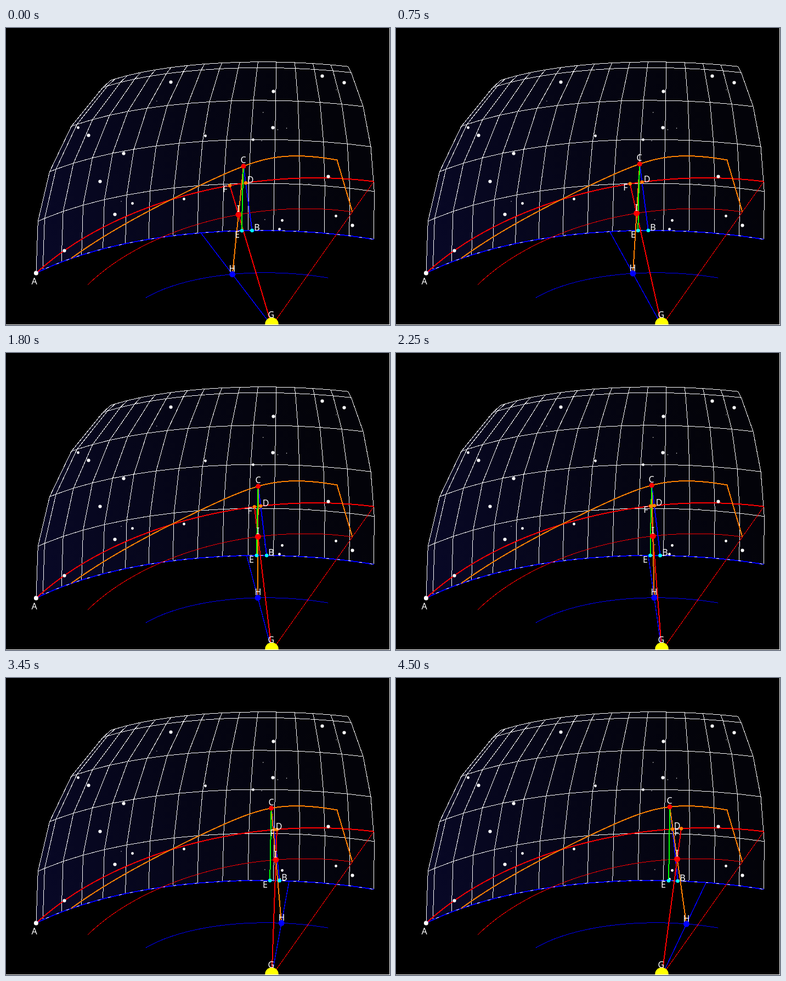
An HTML page that plays this animation: 700x541 px, repeating every 4.65 s.

```html
<!DOCTYPE html>
<html lang="en">
<head>
<meta charset="utf-8">
<title>Planet on the celestial sphere</title>
<style>
  html, body { margin: 0; width: 100%; height: 100%; overflow: hidden; background: #000; }
  svg { display: block; width: 100vw; height: 100vh; }
  path { shape-rendering: crispEdges; fill: none; }
  text { font: 16px "Noto Sans", "Open Sans", sans-serif; fill: #fff; text-anchor: middle; }
</style>
</head>
<body>
<svg viewBox="0 0 700 541">
  <defs>
    <linearGradient id="sky" gradientUnits="userSpaceOnUse" x1="70" y1="400" x2="600" y2="180">
      <stop offset="0" stop-color="#080826"/>
      <stop offset="1" stop-color="#030309"/>
    </linearGradient>
  </defs>
  <g id="scene" transform="translate(.5 .5)"></g>
  <path d="M699.5,0V540.5H0" stroke="#fff"/>
</svg>
<script>
const STEP = 150, STEPS = 31, RAD = Math.PI / 180;
const ORANGE = '#ff8000', RED = '#f00', BLUE = '#00f', CYAN = '#0ff', WHITE = '#fff';
const scene = document.getElementById('scene');

// Sphere of radius 1 around the sun; angles in degrees
const WEST = -62.3, EAST = 24, TOP = 50.5;
const LON_STEP = 6, LAT_STEP = 12;
const INNER = .512, OUTER = .765, INCLINATION = 14.6;
const ELEVATION = 23, ROLL = 1;

const sin = deg => Math.sin(deg * RAD), cos = deg => Math.cos(deg * RAD);
const sphere = (lon, lat = 0, r = 1) =>
  [r * cos(lat) * sin(lon), r * sin(lat), r * cos(lat) * cos(lon)];
const dotProduct = (a, b) => a[0] * b[0] + a[1] * b[1] + a[2] * b[2];
const along = (a, dir, t) => a.map((v, i) => v + dir[i] * t);
const unit = v => v.map(c => c / Math.hypot(...v));

function project([x, y, z]) {
  const up = y * cos(ELEVATION) + z * sin(ELEVATION);
  const depth = z * cos(ELEVATION) - y * sin(ELEVATION);
  const scale = 444 / (.835 + .179 * depth);
  return [
    484 + scale * (x * cos(ROLL) + up * sin(ROLL)),
    542 - scale * (up * cos(ROLL) - x * sin(ROLL))
  ];
}

const SUN = [0, 0, 0];
// Pole of the outer orbit, whose ascending node lies at the west edge
const POLE = [-sin(INCLINATION) * sin(WEST + 90), cos(INCLINATION),
  -sin(INCLINATION) * cos(WEST + 90)];

const orbitLat = lon => Math.atan(Math.tan(INCLINATION * RAD) * sin(lon - WEST)) / RAD;
const innerLon = lon => -17.2 + (lon + 10.5) * 1.88;
const outerPlanet = (lon, r = OUTER) => sphere(lon, orbitLat(lon), r);

// Where the line of sight from the inner to the outer planet meets the sphere
function sighting(lon) {
  const from = sphere(innerLon(lon), 0, INNER);
  const dir = along(outerPlanet(lon), from, -1);
  const a = dotProduct(dir, dir), b = dotProduct(from, dir), c = dotProduct(from, from) - 1;
  return along(from, dir, (Math.sqrt(b * b - a * c) - b) / a);
}

function add(tag, attrs, text) {
  const el = document.createElementNS('http://www.w3.org/2000/svg', tag);
  set(el, attrs);
  if (text) el.textContent = text;
  return scene.appendChild(el);
}
function set(el, attrs) {
  for (const name in attrs) el.setAttribute(name, attrs[name]);
}
const toPath = points =>
  'M' + points.map(p => project(p).map(v => v.toFixed(2))).join('L');
const stroke = (points, color, width = 1) =>
  add('path', { d: toPath(points), stroke: color, 'stroke-width': width });
const dot = ([x, y], r, color) => add('circle', { cx: x, cy: y, r, fill: color });
const range = (n, fn) => Array.from({ length: n + 1 }, (_, i) => fn(i / n));
const sweep = fn => range(60, u => fn(WEST + (EAST - WEST) * u));

// Sky and its grid
const lons = [WEST], lats = [];
for (let lon = -60; lon <= EAST; lon += LON_STEP) lons.push(lon);
for (let lat = 0; lat < TOP; lat += LAT_STEP) lats.push(lat);
lats.push(TOP);
const parallel = lat => lons.map(lon => sphere(lon, lat));
const meridian = lon => lats.map(lat => sphere(lon, lat));

const outline = [...meridian(WEST), ...parallel(TOP), ...meridian(EAST).reverse(),
  ...parallel(0).reverse()];
add('path', { d: toPath(outline), style: 'fill:url(#sky)' });
lats.forEach(lat => stroke(parallel(lat), WHITE));
lons.forEach(lon => stroke(meridian(lon), WHITE));

// Orbits and paths on the sky
const ecliptic = sweep(lon => sphere(lon));
stroke(ecliptic, BLUE, 2);
set(stroke(ecliptic, WHITE), { 'stroke-dasharray': '5 15' });
stroke(sweep(lon => sphere(lon, 0, INNER)), BLUE);
stroke(sweep(lon => outerPlanet(lon)), RED);
stroke(sweep(lon => outerPlanet(lon, 1)), RED, 2);
stroke([...sweep(sighting), outerPlanet(EAST)], ORANGE, 2);
stroke([SUN, outerPlanet(EAST, 1)], RED);

// Stars
const bright = [[300, 98], [576, 87], [616, 99], [487, 115], [486, 181], [150, 195],
  [214, 228], [171, 279], [198, 339], [106, 405], [587, 270], [631, 359]];
const dim = [[131, 181], [363, 196], [450, 203], [230, 319], [601, 342], [503, 350],
  [498, 366], [324, 311]];
bright.forEach(p => dot(p, 3.1, WHITE));
dim.forEach(p => dot(p, 2.4, WHITE));
let seed = 7;
const random = () => (seed = seed * 16807 % 2147483647) / 2147483647;
for (let i = 0; i < 11; i++) {
  const lon = WEST + (EAST - WEST) * random();
  dot(project(sphere(lon, TOP * random())), .7, WHITE);
}
dot(project(sphere(WEST)), 4, WHITE);

// Moving parts
const innerRay = stroke([SUN], BLUE, 1.5);
const arc = stroke([SUN], BLUE, 2);
const outerRay = stroke([SUN], RED, 2);
const sight = stroke([SUN], ORANGE, 2);
const altitude = stroke([SUN], '#0f0', 2);

// dx, dy place each label's baseline
const markers = [
  { name: 'E', r: 3.3, color: CYAN, dx: -9, dy: 12.5 },
  { name: 'B', r: 3.3, color: CYAN, dx: 8.5, dy: -.5 },
  { name: 'D', r: 3.2, color: ORANGE, dx: 9, dy: -.5 },
  { name: 'F', r: 3.2, color: ORANGE, dx: -8.5, dy: 12 },
  { name: 'C', r: 4.5, color: RED, dx: -.5, dy: -6 },
  { name: 'I', r: 5.5, color: RED, dx: 0, dy: -5 },
  { name: 'H', r: 5.5, color: BLUE, dx: 0, dy: -5 }
];
markers.forEach(m => m.dot = dot([0, 0], m.r, m.color));
dot([484, 539], 12.3, '#ff0');
add('text', { x: 51, y: 466 }, 'A');
add('text', { x: 482.8, y: 527 }, 'G');
markers.forEach(m => m.label = add('text', {}, m.name));

function draw(ms) {
  const k = Math.floor(ms / STEP) % STEPS / (STEPS - 1);
  const lon = -10.5 + 14.5 * k;
  const C = sighting(lon);
  const drop = t => unit(along(C, POLE, -t));
  const reach = C[1] / POLE[1];
  const at = {
    C,
    D: drop(dotProduct(C, POLE)),
    B: drop(reach),
    E: unit([C[0], 0, C[2]]),
    F: outerPlanet(lon, 1),
    I: outerPlanet(lon),
    H: sphere(innerLon(lon), 0, INNER)
  };
  for (const m of markers) {
    const [x, y] = project(at[m.name]);
    set(m.dot, { cx: x, cy: y });
    set(m.label, { x: Math.round(x + m.dx), y: Math.round(y + m.dy) });
  }
  set(innerRay, { d: toPath([SUN, sphere(innerLon(lon))]) });
  set(arc, { d: toPath(range(12, u => drop(reach * u))) });
  set(outerRay, { d: toPath([SUN, at.F]) });
  set(sight, { d: toPath([C, at.H]) });
  set(altitude, { d: toPath(range(12, u => unit([C[0], C[1] * u, C[2]]))) });
}

const start = performance.now();
function tick() {
  draw(performance.now() - start);
  requestAnimationFrame(tick);
}
tick();
</script>
</body>
</html>
```
